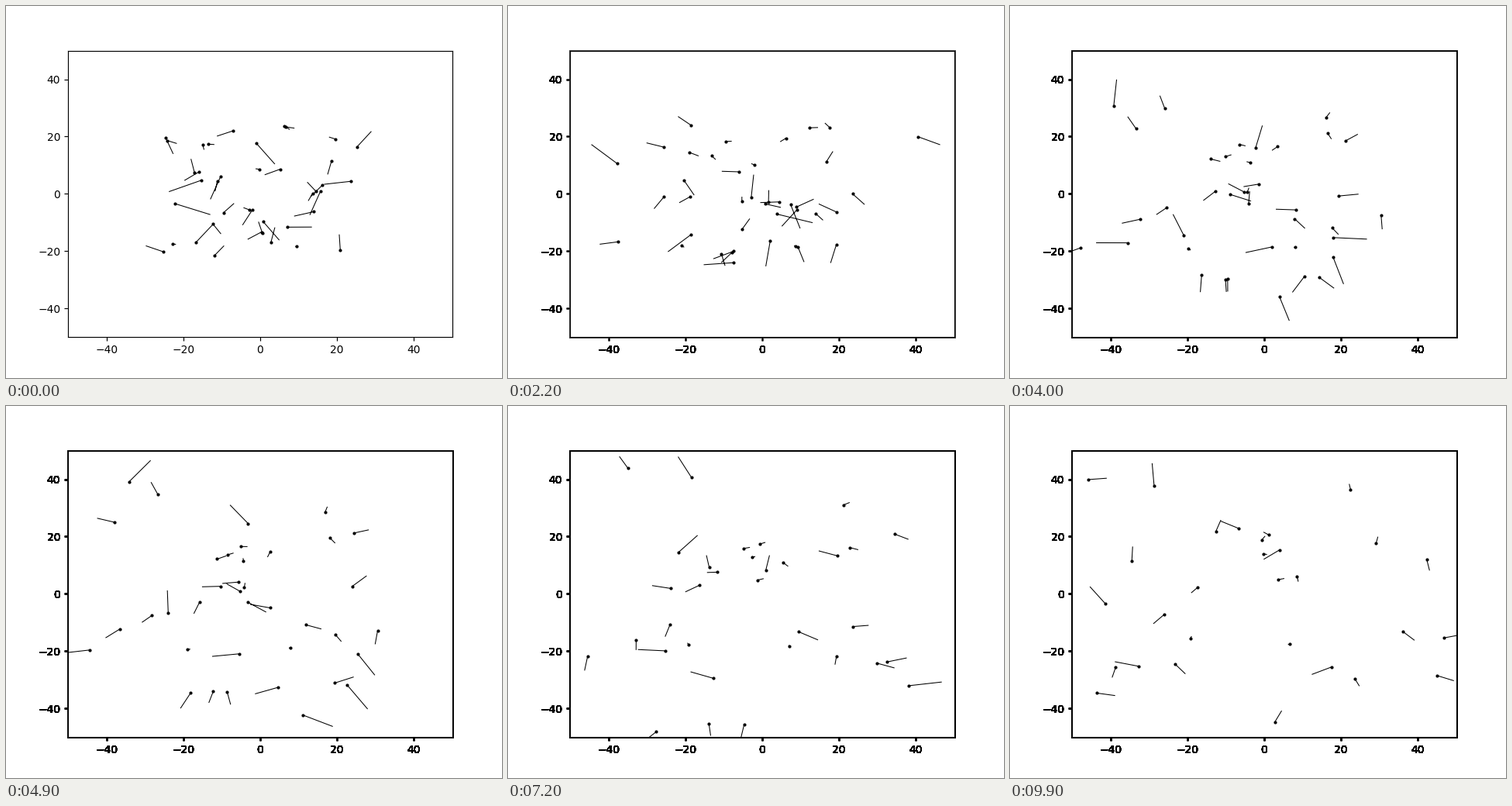
These frames come from a looping animation (640 px wide and 480 px high, 10000 ms). A matplotlib script:

```python
import numpy as np
import matplotlib.pyplot as plt
from matplotlib.animation import FuncAnimation
from matplotlib.artist import Artist

FRAMES, INTERVAL = 100, 100
COUNT = 40
DT = 0.125      # simulated time per frame
WOBBLE = 0.18   # random turn per frame, radians
BLEED = 0.055   # edge darkening added by each repaint
PX = 0.72       # one pixel in points

# Walkers keep their speed while their heading drifts at random.
rng = np.random.default_rng(7)
start = rng.uniform(-25, 25, COUNT) + 1j * rng.uniform(-25, 25, COUNT)
launch = rng.normal(0, 4.1, COUNT) + 1j * rng.normal(0, 4.1, COUNT)
turn = np.cumsum(rng.normal(0, WOBBLE, (FRAMES, COUNT)), axis=0)
velocity = launch * np.exp(1j * turn)
position = start + np.cumsum(velocity, axis=0) * DT


class LabelRepaint(Artist):
    """Repaints the tick labels so that their soft edges darken."""
    zorder = 3
    passes = 0

    def draw(self, renderer):
        for label in ax.get_xticklabels() + ax.get_yticklabels():
            for _ in range(self.passes):
                label.draw(renderer)


def frame_axes(**kw):
    axes = fig.add_subplot(**kw)
    ticks = range(-40, 41, 20)
    axes.set(xlim=(-50, 50), ylim=(-50, 50), xticks=ticks, yticks=ticks)
    return axes


fig = plt.figure(figsize=(6.4, 4.8), dpi=100)

# Wide outline below the main axes: only its outer edge shows.
under = frame_axes(zorder=-1, label="under")
under.tick_params(width=3 * PX, labelbottom=False, labelleft=False)
for spine in under.spines.values():
    spine.set_linewidth(3 * PX)

ax = frame_axes(label="main")
labels = LabelRepaint()
ax.add_artist(labels)
dots, = ax.plot([], [], "ko", ms=2)
sticks, = ax.plot([], [], "k-", lw=0.75)


def update(i):
    shade = str((1 - BLEED) ** (i + 1))
    under.tick_params(color=shade)
    for spine in under.spines.values():
        spine.set_edgecolor(shade)
    labels.passes = min(i, 25)

    pos = position[i]
    tip = pos + velocity[i]
    dots.set_data(pos.real, pos.imag)
    # NaN breaks the line between one walker and the next.
    path = np.column_stack([pos, tip, np.full(COUNT, np.nan + 0j)]).ravel()
    sticks.set_data(path.real, path.imag)
    return dots, sticks


anim = FuncAnimation(fig, update, frames=FRAMES, interval=INTERVAL,
                     repeat=True, repeat_delay=0, blit=False)
plt.show()
```
